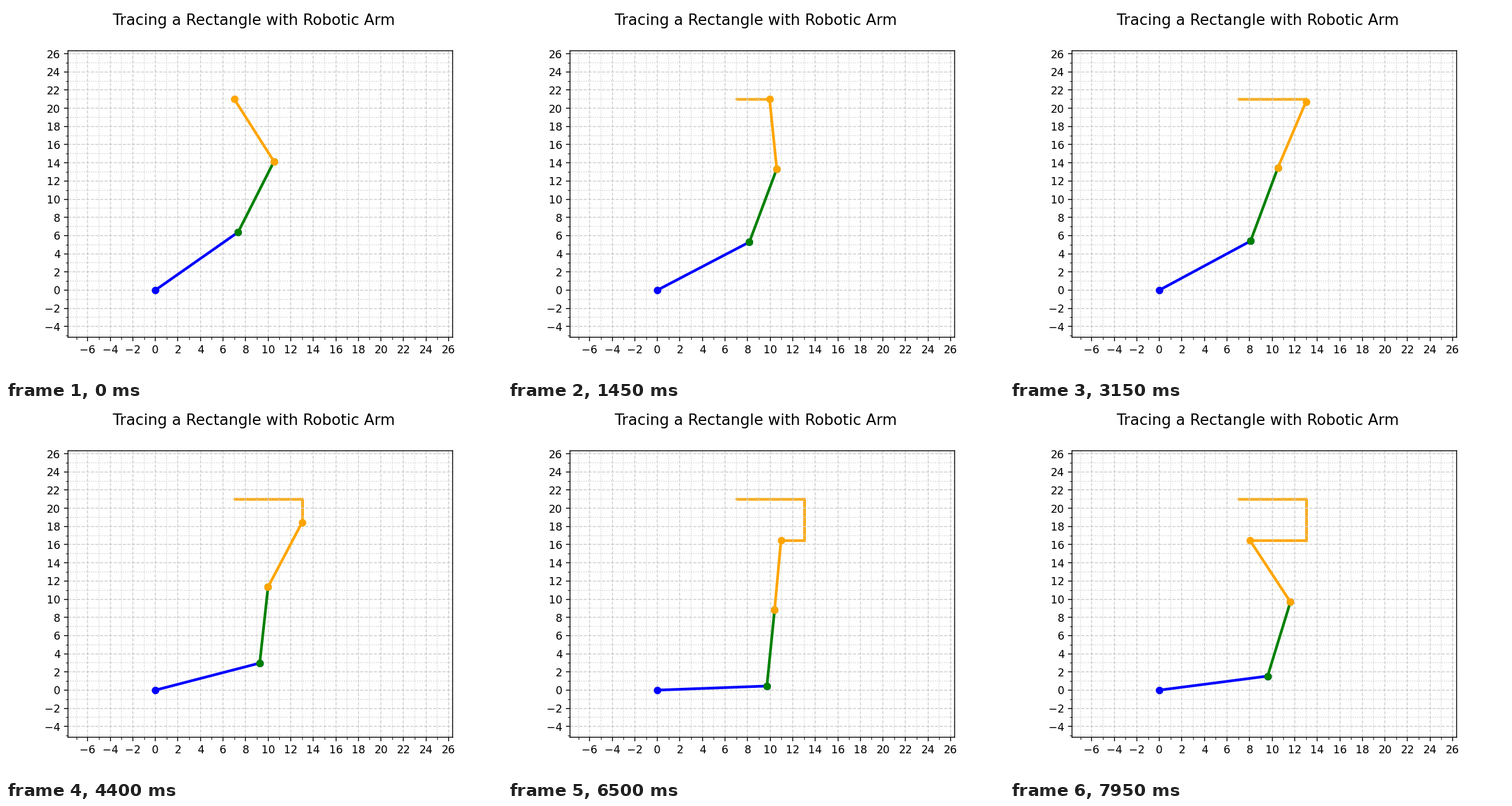
Animation of 864 by 648 pixels, one loop 8 s. Source, as a matplotlib script:

```python
import numpy as np
import matplotlib.pyplot as plt
from matplotlib.animation import FuncAnimation
from matplotlib.ticker import AutoMinorLocator, MultipleLocator

FRAMES, INTERVAL = 160, 50
L1, L2, L3 = 9.72, 8.4, 7.7
REACH = L1 + L2 + L3
LEFT, RIGHT, BOTTOM, TOP = 7, 13, 16.5, 21


def side(start, end, count):
    return np.linspace(start, end, count)


path = np.vstack([
    side((LEFT, TOP), (RIGHT, TOP), 60),
    side((RIGHT, TOP), (RIGHT, BOTTOM), 50),
    side((RIGHT, BOTTOM), (LEFT, BOTTOM), 60),
])


def polar(length, angle):
    return length * np.array([np.cos(angle), np.sin(angle)])


def solve_arm(tip):
    """Joint positions from base to tip, with the elbow on the right."""
    x, y = tip
    # The last link leans more strongly the lower the tip is.
    lean = 10.9 - 0.733 * (y - BOTTOM)
    wrist = tip - polar(L3, np.radians(90 - lean * (x - 10.575)))
    dist = np.hypot(*wrist)
    bend = np.arccos((L1**2 + dist**2 - L2**2) / (2 * L1 * dist))
    elbow = polar(L1, np.arctan2(wrist[1], wrist[0]) - bend)
    return np.array([(0, 0), elbow, wrist, tip])


fig, ax = plt.subplots(figsize=(6.4, 4.8), dpi=135)
fig.suptitle("Tracing a Rectangle with Robotic Arm", fontsize=14)
ax.set_xlim(-0.3 * REACH, 1.02 * REACH)
ax.set_ylim(-0.2 * REACH, 1.02 * REACH)
for axis in (ax.xaxis, ax.yaxis):
    axis.set_major_locator(MultipleLocator(2))
    axis.set_minor_locator(AutoMinorLocator(2))
ax.grid(which="major", color="#CCCCCC", linestyle="--")
ax.grid(which="minor", color="#CCCCCC", linestyle=":")

trail = ax.scatter([], [], s=2, color="orange")
links = [ax.plot([], [], "o-", color=c, lw=2.5)[0]
         for c in ("blue", "green", "orange")]


def update(i):
    joints = solve_arm(path[i])
    for k, link in enumerate(links):
        link.set_data(joints[k:k + 2, 0], joints[k:k + 2, 1])
    trail.set_offsets(path[:i + 1])
    return [trail, *links]


anim = FuncAnimation(fig, update, frames=FRAMES, interval=INTERVAL,
                     init_func=lambda: update(0), repeat=True, repeat_delay=0)
plt.show()
```
